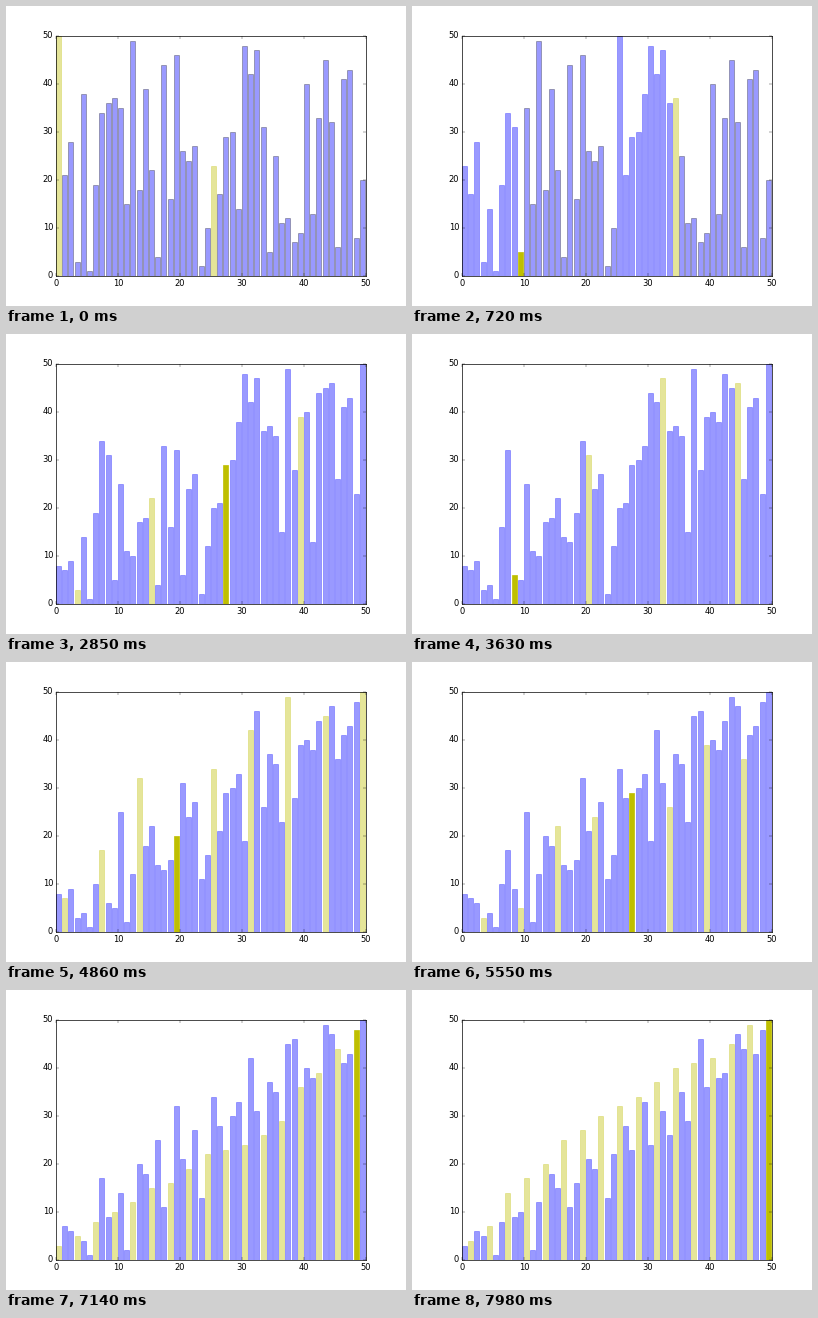
These frames come from a looping animation (400x300 px, 8 s). A matplotlib script:

```python
from itertools import islice

import matplotlib.pyplot as plt
from matplotlib.animation import FuncAnimation

plt.style.use("classic")
plt.rcParams.update({
    "figure.facecolor": "white",
    "savefig.dpi": "figure",
    "font.family": "DejaVu Sans",
})

LOOP_MS = 8000
STEPS = 267
DATA = [50, 21, 28, 3, 38, 1, 19, 34, 36, 37, 35, 15, 49, 18, 39, 22, 4,
        44, 16, 46, 26, 24, 27, 2, 10, 23, 17, 29, 30, 14, 48, 42, 47, 31,
        5, 25, 11, 12, 7, 9, 40, 13, 33, 45, 32, 6, 41, 43, 8, 20]
N = len(DATA)


def shell_sort(data):
    """Yield (values, group, cursor, touched) for every step of the sort."""
    a = list(data)
    touched = set()
    gap = N // 2
    while gap:
        for start in range(gap):
            group = range(start, N, gap)
            touched.update(group)

            def state(cursor=None):
                return a[:], group, cursor, frozenset(touched)

            yield state()
            for i in group[1:]:
                yield state(i)
                j = i
                while j >= gap and a[j - gap] > a[j]:
                    a[j - gap], a[j] = a[j], a[j - gap]
                    j -= gap
                    yield state(j)
        gap //= 2


states = list(islice(shell_sort(DATA), STEPS))

fig, ax = plt.subplots(figsize=(8, 6), dpi=50)
bars = ax.bar(range(N), DATA, width=0.8, align="edge",
              color="b", edgecolor="k", alpha=0.4)
ax.set_xlim(0, N)
ax.set_ylim(0, N)


def draw(step):
    values, group, cursor, touched = states[step]
    for i, bar in enumerate(bars):
        face = "y" if i in group else "b"
        bar.set_height(values[i])
        bar.set_facecolor(face)
        bar.set_edgecolor(face if i in touched else "k")
        bar.set_alpha(1 if i == cursor else 0.4)
    return bars.patches


anim = FuncAnimation(fig, draw, frames=STEPS, init_func=lambda: draw(0),
                     interval=LOOP_MS / STEPS, repeat=True, repeat_delay=0)
plt.show()
```
